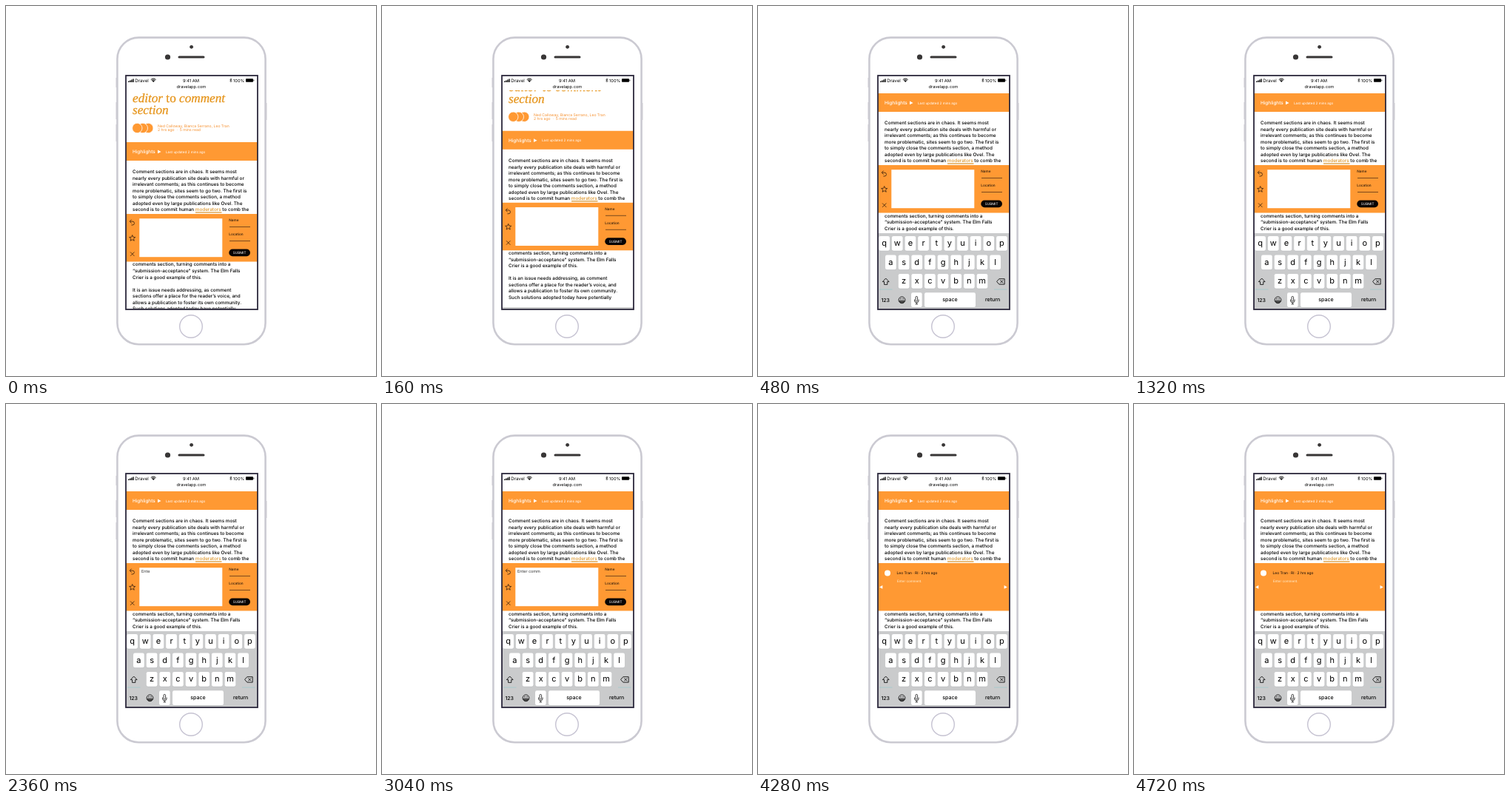
An HTML page for the animation above (4760 ms loop, 500x500 px).

```html
<!DOCTYPE html>
<html lang="en">
<head>
<meta charset="utf-8">
<title>Comment box</title>
<style>
  html, body { margin: 0; width: 100%; height: 100%; overflow: hidden; background: #fff; }
  svg { display: block; width: 100vw; height: 100vh; }
  text { font-family: Inter, Roboto, sans-serif; text-rendering: geometricPrecision; white-space: pre; }
  .title, .title tspan { font-family: "Liberation Serif", serif; }
</style>
</head>
<body>
<svg id="stage" viewBox="0 0 500 500" xmlns="http://www.w3.org/2000/svg">
  <defs>
    <clipPath id="screen"><rect x="162" y="94" width="178" height="316"/></clipPath>
  </defs>

  <!-- phone body -->
  <g fill="none" stroke="#cbcad2">
    <path d="M149.2 97v13M149.2 130v23M149.2 160v23M351.8 131v23" stroke-width="1.4"/>
    <rect x="150.4" y="42.6" width="200.2" height="414.6" rx="29" stroke-width="2.6"/>
    <circle cx="250" cy="433" r="15.3" stroke="#c6c3d2" stroke-width="1.4"/>
  </g>
  <g fill="#383636">
    <circle cx="250.6" cy="55.3" r="2.4"/>
    <circle cx="218.5" cy="69" r="3.6"/>
    <rect x="232.5" y="67.4" width="36" height="3.2" rx="1.6"/>
  </g>

  <g clip-path="url(#screen)">
    <g id="page">
      <text class="title" font-size="17.2" font-style="italic" fill="#e6961e" stroke="#e6961e" stroke-width=".3"><tspan x="171" y="130">editor </tspan><tspan font-style="normal">to</tspan><tspan> comment</tspan><tspan x="171" y="146.2">section</tspan></text>
      <g fill="#ff9933" stroke="#fff" stroke-width=".8">
        <circle cx="192.3" cy="165" r="6.7"/>
        <circle cx="184.8" cy="165" r="6.7"/>
        <circle cx="177.3" cy="165" r="6.7"/>
      </g>
      <g font-size="5.1" fill="#f5902f">
        <text x="205" y="163.8">Ned Calloway, Bianca Serrano, Leo Tran</text>
        <text x="205" y="169.5">2 hrs ago  ·  5 mins read</text>
      </g>
      <rect x="162" y="184" width="178" height="25" fill="#ff9933"/>
      <g fill="#fff">
        <text x="171" y="199" font-size="6.4" font-weight="500">Highlights</text>
        <path d="M205 194.5l4.6 2.4l-4.6 2.4z"/>
        <text x="216" y="198.6" font-size="4.6">Last updated 2 mins ago</text>
      </g>
      <g id="copy" font-size="6.34" font-weight="500" fill="#000"></g>
      <rect x="162" y="281" width="178" height="64.5" fill="#ff9933"/>

      <g id="editor">
        <g fill="none" stroke="#4a2b10" stroke-width=".9" stroke-linejoin="round">
          <path d="M169.6 288.6l-2.4 2.5l2.4 2.5M167.4 291.1h3.6a2.4 2.4 0 0 1 0 4.9h-1.6"/>
          <path id="star"/>
          <path d="M168 332.5l5.4 5.4M173.4 332.5l-5.4 5.4"/>
        </g>
        <rect x="180.3" y="287.2" width="112" height="52" fill="#fff"/>
        <text id="typed" x="183" y="294" font-size="5.45" fill="#333"></text>
        <g font-size="4.7" font-weight="500" fill="#2a1a0c">
          <text x="301.3" y="291.4">Name</text>
          <text x="301.3" y="310.4">Location</text>
        </g>
        <path d="M302 298.5h28M302 317.5h28" stroke="#7a4a1c"/>
        <rect x="301.3" y="328.6" width="28.7" height="9.6" rx="4.8" fill="#080404"/>
        <text x="315.7" y="335.1" font-size="4.6" fill="#fff" text-anchor="middle">SUBMIT</text>
      </g>

      <g id="reply">
        <circle cx="175" cy="294.5" r="4" fill="#fff"/>
        <text x="187.5" y="296" font-size="4.9" font-weight="500" fill="#2a1a0c">Leo Tran · RI · 2 hrs ago</text>
        <text x="188" y="306.7" font-size="4.5" fill="#fff3d8">Enter comment.</text>
        <path d="M168.3 311v4.8l-4.2-2.4zM332.6 311v4.8l4.2-2.4z" fill="#fff"/>
      </g>
    </g>

    <!-- status bar -->
    <rect x="162" y="94" width="178" height="20" fill="#fff"/>
    <g fill="#000">
      <path d="M165 101.5h1.4v1.5h-1.4zM167.1 100.6h1.4v2.4h-1.4zM169.2 99.6h1.4v3.4h-1.4zM171.3 98.5h1.4v4.5h-1.4z"/>
      <text x="174.3" y="103" font-size="6.1">Dravel</text>
      <text x="250" y="103" font-size="5.8" text-anchor="middle">9:41 AM</text>
      <text x="250.4" y="111" font-size="5.65" text-anchor="middle">dravelapp.com</text>
      <text x="307" y="103" font-size="5.7">100%</text>
      <rect x="324" y="98.2" width="10" height="4.6" rx=".8"/>
      <rect x="334.5" y="99.6" width=".8" height="1.8"/>
      <path d="M197.6 101.2L199.2 103L200.8 101.2Q199.2 100 197.6 101.2z"/>
      <g fill="none" stroke="#000">
        <path d="M195.8 99.4Q199.2 96.4 202.6 99.4M196.8 100.7Q199.2 98.6 201.6 100.7" stroke-width=".9"/>
        <path d="M302.6 99.2l2.4 2.4l-1.2 1.2v-4.8l1.2 1.2l-2.4 2.4" stroke-width=".6"/>
      </g>
    </g>

    <!-- keyboard, drawn in its raised place -->
    <g id="board">
      <rect x="162" y="307" width="178" height="135" fill="#cacbcc"/>
      <g id="keys"></g>
      <g fill="none" stroke="#111" stroke-width=".9" stroke-linejoin="round">
        <path d="M172.7 368l4.4 4.6h-2.3v3.8h-4.2v-3.8h-2.3z"/>
        <path d="M322.6 372.4l3.2-3.7h7.4v7.4h-7.4zM327.4 370.5l3.8 3.8M331.2 370.5l-3.8 3.8"/>
        <circle cx="194.5" cy="397.3" r="4.4"/>
        <path d="M191.4 398.2h6.2a3.1 3.1 0 0 1-6.2 0z" fill="#555" stroke-width=".7"/>
        <rect x="213" y="392.4" width="2.6" height="6.6" rx="1.3" stroke-width=".8"/>
        <path d="M211.5 396.6v1.4a2.8 2.8 0 0 0 5.6 0v-1.4M214.3 400.8v2M212.6 402.8h3.4" stroke-width=".8"/>
      </g>
      <path d="M164 383h17.5M319 383h17.5" stroke="#9cc9cc" stroke-width=".8"/>
      <g fill="#111">
        <circle cx="192.9" cy="395.8" r=".7"/>
        <circle cx="196.1" cy="395.8" r=".7"/>
      </g>
      <g font-size="7" font-weight="500" fill="#000" text-anchor="middle">
        <text x="172.2" y="399.8">123</text>
        <text x="259.5" y="399.4">space</text>
        <text x="317.2" y="399.4">return</text>
      </g>
    </g>
  </g>
  <rect x="162" y="94" width="178" height="316" fill="none" stroke="#2c283c" stroke-width="1.8"/>
</svg>

<script>
const LOOP = 4760, RISE = 484, SCROLL = 66, LIFT = 130;
const TYPE_AT = 1960, PER_CHAR = 120, SUBMIT_AT = 4240;
const MESSAGE = "Enter comment";
const $ = id => document.getElementById(id);

function add(parent, tag, attrs, content = "") {
  const el = document.createElementNS("http://www.w3.org/2000/svg", tag);
  for (const k in attrs) el.setAttribute(k, attrs[k]);
  el.textContent = content;
  parent.appendChild(el);
  return el;
}

function writeLines(lines, top) {
  lines.forEach((line, i) => {
    const y = top + i * 8.53;
    const row = add($("copy"), "text", { x: 171, y });
    line.split("*").forEach((part, j) =>
      add(row, "tspan", j === 1 ? { fill: "#dc962c" } : {}, part));
  });
}

writeLines([
  "Comment sections are in chaos. It seems most",
  "nearly every publication site deals with harmful or",
  "irrelevant comments; as this continues to become",
  "more problematic, sites seem to go two. The first is",
  "to simply close the comments section, a method",
  "adopted even by large publications like Ovel. The",
  "second is to commit human *moderators* to comb the"
], 226.3);
writeLines([
  "comments section, turning comments into a",
  "“submission-acceptance” system. The Elm Falls",
  "Crier is a good example of this.",
  "",
  "It is an issue needs addressing, as comment",
  "sections offer a place for the reader’s voice, and",
  "allows a publication to foster its own community.",
  "Such solutions adopted today have potentially"
], 351.5);
add($("copy"), "rect", { x: 256, y: 278.4, width: 35.5, height: 1.2, fill: "#d9922a" });

function key(x, y, w) {
  add($("keys"), "rect", { x, y: y + .5, width: w, height: 19.8, rx: 2.2, fill: "#b2b4b7" });
  add($("keys"), "rect", { x, y, width: w, height: 19.8, rx: 2.2, fill: "#fff" });
}
["qwertyuiop", "asdfghjkl", "zxcvbnm"].forEach((row, r) => {
  const first = [170.6, 179.4, 197.1][r], y = 311 + r * 25.5;
  [...row].forEach((ch, i) => {
    const x = first + i * 17.65;
    key(x - 7.4, y, 14.8);
    add($("keys"), "text", { x, y: y + 13.4, "font-size": 11, "text-anchor": "middle", fill: "#000" }, ch);
  });
});
key(207, 387.3, 14.7);
key(225, 387.3, 69);

let star = "";
for (let i = 0; i < 10; i++) {
  const a = i * Math.PI / 5 - Math.PI / 2, r = i % 2 ? 1.9 : 4.3;
  star += (i ? "L" : "M") + (170.7 + r * Math.cos(a)).toFixed(2) + " " + (313.8 + r * Math.sin(a)).toFixed(2);
}
$("star").setAttribute("d", star + "z");

// cubic-bezier(.42, 0, .58, 1), solved by bisection
function ease(x) {
  if (x >= 1) return 1;
  let lo = 0, hi = 1;
  for (let i = 0; i < 24; i++) {
    const s = (lo + hi) / 2, q = 1 - s;
    if (1.26 * s * q * q + 1.74 * s * s * q + s * s * s < x) lo = s; else hi = s;
  }
  return lo * lo * (3 - 2 * lo);
}

function draw(t) {
  const p = ease(t / RISE);
  $("page").setAttribute("transform", `translate(0 ${-SCROLL * p})`);
  $("board").setAttribute("transform", `translate(0 ${LIFT * (1 - p)})`);
  const count = Math.max(0, Math.floor((t - TYPE_AT) / PER_CHAR) + 1);
  $("typed").textContent = MESSAGE.slice(0, count);
  const sent = t >= SUBMIT_AT;
  $("editor").setAttribute("display", sent ? "none" : "inline");
  $("reply").setAttribute("display", sent ? "inline" : "none");
}

const start = performance.now();
function tick() {
  draw((performance.now() - start) % LOOP);
  requestAnimationFrame(tick);
}
draw(0);
requestAnimationFrame(tick);
</script>
</body>
</html>
```
